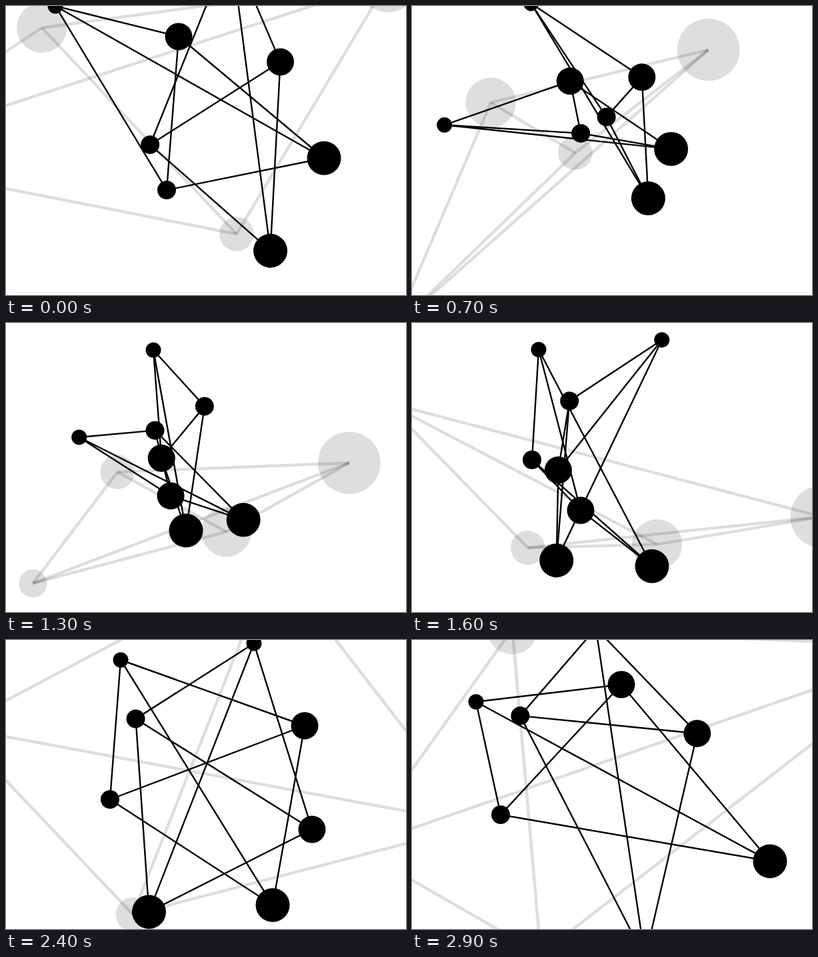
Recreate the animation shown at these times as an HTML page. Size 600 px wide and 435 px high, loop 3 s.

```html
<!DOCTYPE html>
<html lang="en">
<head>
<meta charset="utf-8">
<title>Drifting network</title>
<style>
  html, body { margin: 0; width: 100%; height: 100%; overflow: hidden; background: #fff; }
  svg { display: block; width: 600px; height: 435px; }
  line { stroke: #000; stroke-width: 2.4; }
  .far line, .far circle { opacity: .13; }
</style>
</head>
<body>
<svg id="stage" viewBox="0 0 600 435"></svg>
<script>
const LOOP = 3000, STEP = 100;
const NS = 'http://www.w3.org/2000/svg';
const stage = document.getElementById('stage');

// Four linked nodes wander around a centre; every copy shares the same paths.
const times = [0, 400, 1100, 1600, 2000, 2400, 2900];
const nodes = [
  { r: 11.5, x: [-223, -237, -233, -107, -46.5, -125, -201], y: [-218, -131, 22, -178, -239, -188, -125] },
  { r: 14, x: [-56, -52, -48, -117, -139, -141, -164], y: [59, 21, -70, -12, 67, 22, 45] },
  { r: 20.5, x: [-38, -63, -45, -44, 48, 151, 17], y: [-172, -173, 9, 64, 8, -89, -151] },
  { r: 25.5, x: [180, 127, 60, 63, 51, 103, 240], y: [11, -4, 30, 148, 141, 181, 115] }
];
const links = [[0, 1], [0, 2], [0, 3], [1, 2], [1, 3], [2, 3]];
const copies = [
  { cls: 'far', transform: 'translate(335 194) rotate(-47.7) scale(1.84)' },
  { cls: 'near', transform: 'translate(297 218)' },
  { cls: 'near', transform: 'translate(297 218) rotate(53)' }
];

function add(parent, tag, attrs) {
  const el = parent.appendChild(document.createElementNS(NS, tag));
  for (const key in attrs) el.setAttribute(key, attrs[key]);
  return el;
}

const nets = copies.map(({ cls, transform }) => {
  const g = add(stage, 'g', { class: cls, transform });
  return {
    lines: links.map(() => add(g, 'line', {})),
    dots: nodes.map(n => add(g, 'circle', { r: n.r }))
  };
});

function slope(v, i) {
  return (v[i + 1] - v[i]) / (times[i + 1] - times[i]);
}

function tangent(v, i) {
  const last = times.length - 1;
  if (i === 0) return slope(v, 0);
  if (i === last) return slope(v, last - 1);
  const a = times[i] - times[i - 1], b = times[i + 1] - times[i];
  return (b * slope(v, i - 1) + a * slope(v, i)) / (a + b);
}

// Cubic Hermite curve through unevenly spaced values
function curve(v, t) {
  let i = 0;
  while (i < times.length - 2 && t >= times[i + 1]) i++;
  const h = times[i + 1] - times[i];
  const u = Math.min(1, (t - times[i]) / h), w = 1 - u;
  return v[i] * (1 + 2 * u) * w * w + v[i + 1] * u * u * (3 - 2 * u)
    + h * u * w * (tangent(v, i) * w - tangent(v, i + 1) * u);
}

function draw(ms) {
  const t = Math.floor((ms % LOOP) / STEP) * STEP;
  const pos = nodes.map(n => [curve(n.x, t), curve(n.y, t)]);
  for (const { lines, dots } of nets) {
    lines.forEach((line, i) => {
      const [a, b] = links[i];
      line.setAttribute('x1', pos[a][0]);
      line.setAttribute('y1', pos[a][1]);
      line.setAttribute('x2', pos[b][0]);
      line.setAttribute('y2', pos[b][1]);
    });
    dots.forEach((dot, i) => {
      dot.setAttribute('cx', pos[i][0]);
      dot.setAttribute('cy', pos[i][1]);
    });
  }
}

const start = performance.now();
function tick() {
  draw(performance.now() - start);
  requestAnimationFrame(tick);
}
draw(0);
requestAnimationFrame(tick);
</script>
</body>
</html>
```
